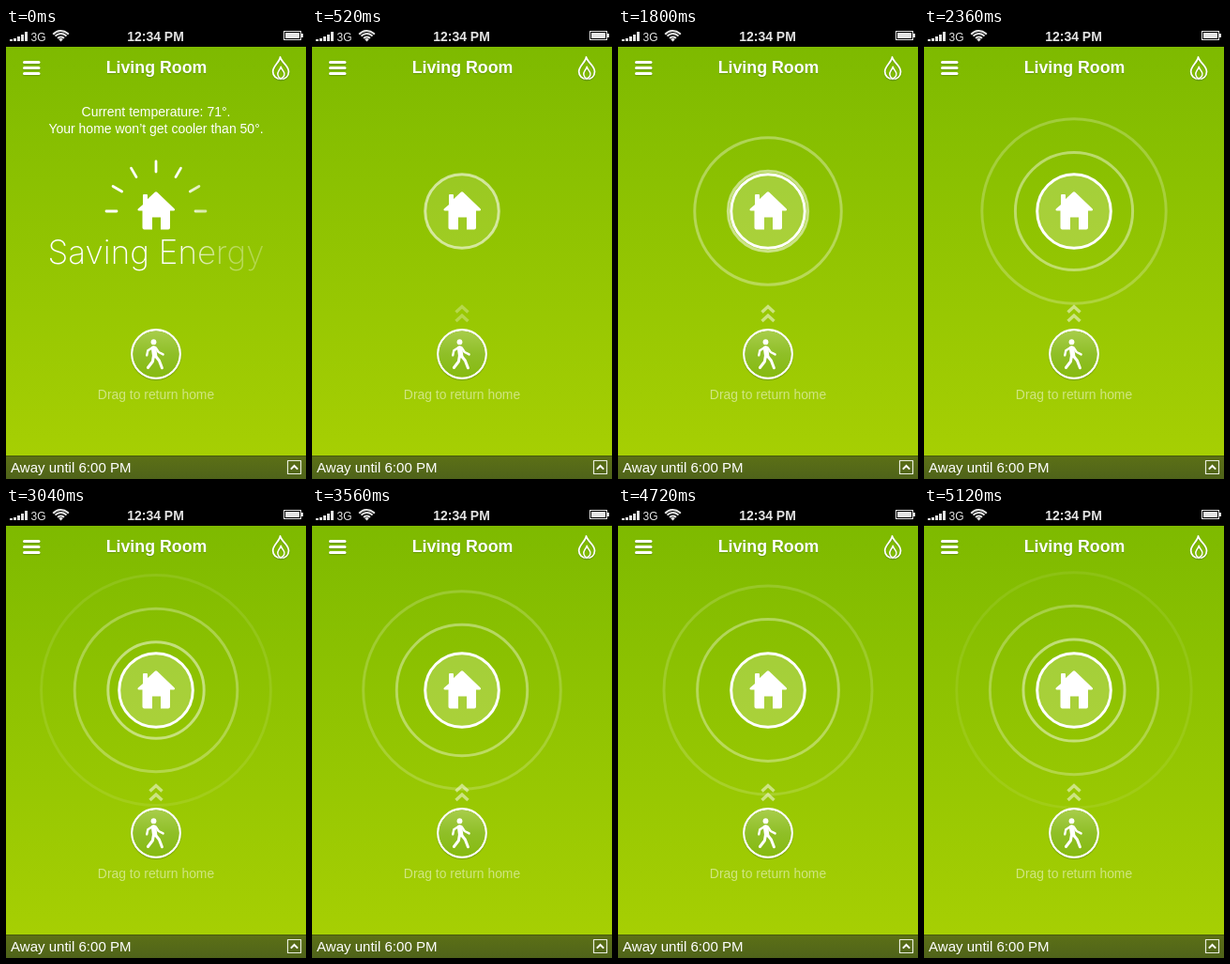
These frames come from a looping animation (320 by 480 pixels, 5.16 s). An HTML page with a canvas:

```html
<!DOCTYPE html>
<html lang="en">
<head>
<meta charset="utf-8">
<title>Living Room</title>
<style>
html, body { margin: 0; width: 100%; height: 100%; overflow: hidden; background: #8cc200; }
canvas { display: block; width: 320px; height: 480px; }
</style>
</head>
<body>
<canvas id="stage"></canvas>
<script>
const W = 320, H = 480, LOOP = 5160, STEP = 40;
const CX = 160, CY = 195;
const SANS = '"Liberation Sans", Arial, sans-serif';
const LIGHT = 'Inter, "Open Sans", sans-serif';
const canvas = document.getElementById('stage');
const ctx = canvas.getContext('2d');
const ratio = window.devicePixelRatio || 1;
canvas.width = W * ratio;
canvas.height = H * ratio;
ctx.scale(ratio, ratio);

const white = a => `rgba(255,255,255,${a})`;
const ramp = (t, a, b) => Math.min(1, Math.max(0, (t - a) / (b - a)));

function gradient(x0, y0, x1, y1, ...colors) {
  const g = ctx.createLinearGradient(x0, y0, x1, y1);
  colors.forEach((c, i) => g.addColorStop(i / (colors.length - 1), c));
  return g;
}

function text(str, x, y, size, color = '#fff', align = 'center', weight = 400, family = SANS) {
  ctx.font = `${weight} ${size}px ${family}`;
  ctx.textAlign = align;
  ctx.fillStyle = color;
  ctx.fillText(str, x, y);
}

function box(x, y, w, h, color) {
  ctx.fillStyle = color;
  ctx.fillRect(x, y, w, h);
}

function circle(x, y, r, stroke, width, fill) {
  ctx.beginPath();
  ctx.arc(x, y, r, 0, Math.PI * 2);
  if (fill) { ctx.fillStyle = fill; ctx.fill(); }
  if (stroke) { ctx.strokeStyle = stroke; ctx.lineWidth = width; ctx.stroke(); }
}

function line(color, width, ...p) {
  ctx.strokeStyle = color;
  ctx.lineWidth = width;
  ctx.beginPath();
  for (let i = 0; i < p.length; i += 2) ctx.lineTo(p[i], p[i + 1]);
  ctx.stroke();
}

function strokePath(d, width, color = '#fff') {
  ctx.strokeStyle = color;
  ctx.lineWidth = width;
  ctx.stroke(new Path2D(d));
}

function fillPath(d, color = '#fff') {
  ctx.fillStyle = color;
  ctx.fill(new Path2D(d), 'evenodd');
}

function withShadow(draw) {
  ctx.save();
  ctx.shadowColor = 'rgba(50,90,0,.4)';
  ctx.shadowOffsetY = ratio;
  ctx.shadowBlur = ratio;
  draw();
  ctx.restore();
}

function statusBar() {
  const c = '#e4e4e4';
  box(0, 0, W, 20, '#000');
  for (let i = 0; i < 5; i++) {
    const h = [2, 3, 5, 7, 10][i];
    box(4 + i * 4, 14 - h, 3, h, c);
  }
  text('3G', 26.5, 14, 12, c, 'left');
  ctx.lineCap = 'butt';
  for (const r of [4.5, 8, 11]) {
    ctx.beginPath();
    ctx.arc(58.5, 14, r, -Math.PI * 0.77, -Math.PI * 0.23);
    ctx.strokeStyle = c;
    ctx.lineWidth = 2;
    ctx.stroke();
  }
  fillPath('M58.5 14.5l-2.4-2.5q2.4-1.8 4.8 0z', c);
  text('12:34 PM', 159.5, 14, 14, c, 'center', 700);
  ctx.strokeStyle = c;
  ctx.lineWidth = 1;
  ctx.strokeRect(296.5, 3.5, 18, 9);
  box(298, 5, 15, 6, c);
  box(315, 6, 2, 4, c);
}

function header() {
  withShadow(() => {
    text('Living Room', 160.5, 48, 17.8, '#fff', 'center', 700);
    ctx.lineCap = 'round';
    for (const y of [36.5, 42.5, 48.5]) line('#fff', 3, 19.5, y, 35, y);
    strokePath('M292.5 31C294 37 301.5 40 301.5 46.5C301.5 51.5 297.8 54.3 293 54.3C288.2 54.3 284.7 51.2 284.7 46.5C284.7 40.5 291.5 37 292.5 31Z', 1.8);
    strokePath('M293 54C289.5 52 289 48.5 291 45.5Q292.5 43.5 293.2 41.2Q294 44 296 46.2C298 49 297 52.5 293 54Z', 1.5);
  });
}

function walker() {
  withShadow(() => circle(160, 347, 25.7, '#fff', 2.4));
  circle(160, 347, 24.6, null, 0, gradient(0, 322, 0, 372, '#a8cd4b', '#8fbf27', '#86ba10'));
  circle(157.5, 334.2, 2.9, null, 0, '#fff');
  ctx.lineCap = ctx.lineJoin = 'round';
  line('#fff', 5.4, 157.6, 341, 158.6, 348.5);
  line('#fff', 2.4, 156, 340.2, 151.3, 343.2, 150.2, 348.4);
  line('#fff', 2.4, 159.6, 340.2, 162.8, 345, 167.6, 347.4);
  line('#fff', 3, 157.4, 349, 156.4, 355, 151.4, 361.5);
  line('#fff', 3, 159.4, 349, 163.4, 354, 166.4, 361.8);
  text('Drag to return home', 160, 395, 13.9, white(0.5));
}

function footer() {
  box(0, 455, W, 25, gradient(0, 455, 0, 480, '#5c7016', '#4f631a'));
  box(0, 455, W, 1, '#465a0c');
  text('Away until 6:00 PM', 5, 472.5, 15.05, '#fff', 'left');
  ctx.strokeStyle = '#e8eddc';
  ctx.lineWidth = 1.2;
  ctx.strokeRect(300.5, 460.5, 14, 14);
  ctx.lineCap = 'butt';
  ctx.lineJoin = 'miter';
  line('#fff', 2, 303.8, 469.6, 307.5, 466, 311.2, 469.6);
}

function house() {
  fillPath('M146 188V178Q146 177 147 177H150Q151 177 151 178V182L158.5 175Q160 173.6 161.5 175L179.5 192.2Q181 194 178.8 194.5H175V212.5Q175 214.5 173 214.5H165V201.5H156V214.5H147.5Q145.5 214.5 145.5 212.5V194.5H141.8Q139.6 194 141 192.3Z');
}

function savingBanner(alpha) {
  if (alpha <= 0) return;
  ctx.save();
  ctx.globalAlpha = alpha;
  text('Current temperature: 71°.', 160, 94, 14);
  text('Your home won’t get cooler than 50°.', 160, 112, 14);
  const fade = ctx.createLinearGradient(44, 0, 276, 0);
  fade.addColorStop(0, '#fff');
  fade.addColorStop(0.6, '#fff');
  fade.addColorStop(0.82, white(0.4));
  fade.addColorStop(1, white(0.28));
  text('Saving Energy', 160, 251, 35, fade, 'center', 200, LIGHT);
  ctx.lineCap = 'round';
  for (let i = 0; i < 7; i++) {
    const a = Math.PI * (1 + i / 6), c = Math.cos(a), s = Math.sin(a);
    // A hair of slope keeps the level rays paintable with the gradient.
    line(fade, 2.8, CX + 42 * c, CY + 42 * s, CX + 53 * c, CY + 53 * s);
  }
  ctx.restore();
}

function homeSpot(alpha) {
  if (alpha <= 0) return;
  ctx.save();
  ctx.globalAlpha = alpha;
  circle(CX, CY, 39.3, '#fff', 3, white(0.22));
  ctx.lineCap = 'butt';
  ctx.lineJoin = 'miter';
  for (const y of [296, 305.5]) line(white(0.5), 3.4, 153.5, y + 6.5, 160, y + 0.5, 166.5, y + 6.5);
  ctx.restore();
}

// One ring leaves the house every second and fades as it grows.
function rings(t) {
  for (let born = 720; born < t; born += 1000) {
    const r = 39.8 + (t - born) * 0.0356;
    if (r > 134) continue;
    circle(CX, CY, r, white(0.54 * (1 - (r - 40) / 100)), 3);
  }
}

function draw(t) {
  box(0, 0, W, H, gradient(0, 20, 0, 455, '#7eba00', '#a6cf03'));
  rings(t);
  savingBanner(1 - ramp(t, 0, 480));
  homeSpot(ramp(t, 240, 720));
  house();
  walker();
  header();
  footer();
  statusBar();
}

const start = performance.now();
function tick() {
  const t = (performance.now() - start) % LOOP;
  draw(Math.floor(t / STEP) * STEP);
  requestAnimationFrame(tick);
}
tick();
</script>
</body>
</html>
```
